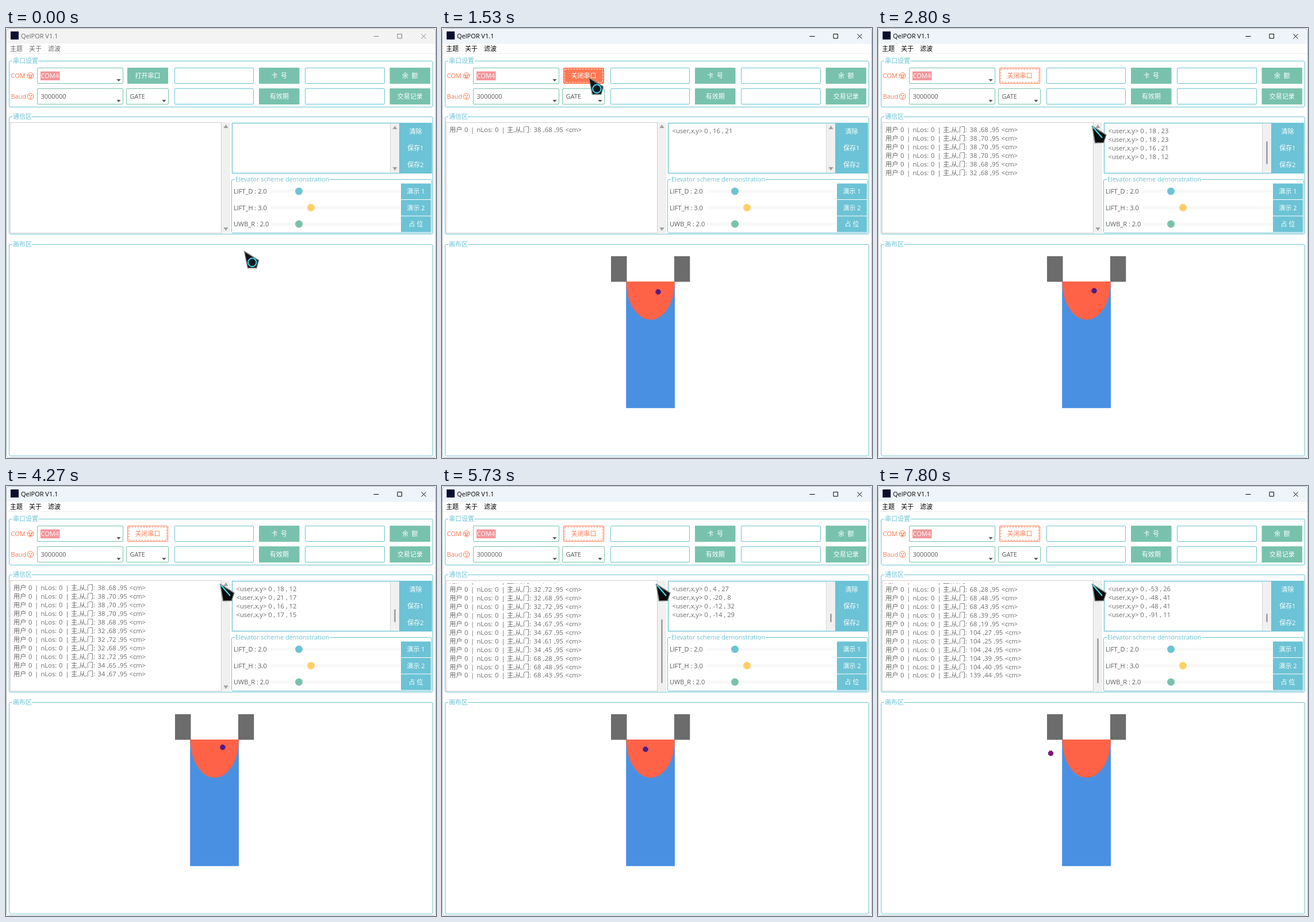
Recreate the animation shown at these times as an HTML page. Size 748x748 px, loop 8000 ms.

```html
<!DOCTYPE html>
<html lang="zh">
<head>
<meta charset="utf-8">
<title>QelPOR V1.1</title>
<style>
html, body { margin: 0; width: 100%; height: 100%; overflow: hidden; background: #fff; }
svg { display: block; width: 748px; height: 748px; }
text { font: 11px "Open Sans", "Noto Sans CJK SC", "Noto Sans CJK", sans-serif; fill: #5a5a5a; }
.log text { font-size: 11.2px; fill: #6a6a6a; }
#log text { word-spacing: .8px; }
</style>
</head>
<body>
<svg id="stage" viewBox="0 0 748 748" xmlns="http://www.w3.org/2000/svg"></svg>
<script>
const CYAN = '#6cc3d5', GREEN = '#78c2ad', ORANGE = '#ff7851', YELLOW = '#ffce67';
const LOOP = 8000, TICK = 1000 / 15, GATE = 95;

// tick, distance to main, distance to slave, marker x, marker y
const ROWS = [
  [23, 38, 68, 376, 459], [26, 38, 70, 376.5, 459.5], [30, 38, 70, 377, 460],
  [34, 38, 70, 377, 460], [38, 38, 68, 376.5, 459], [42, 32, 68, 376, 457],
  [46, 32, 72, 378, 456.5], [49, 32, 68, 378, 455.5], [57, 32, 72, 379, 456],
  [61, 34, 65, 377, 454.5], [64, 34, 67, 377, 454.5], [68, 34, 67, 377, 454.5],
  [71, 34, 61, 375, 452], [75, 34, 45, 370, 459], [80, 68, 28, 359, 455],
  [83, 68, 48, 356, 457], [86, 68, 43, 354, 458], [90, 68, 39, 351, 460],
  [94, 68, 19, 346, 460], [98, 104, 27, 333, 467], [102, 104, 25, 324, 471],
  [106, 104, 24, 320, 468], [109, 104, 39, 319, 466], [113, 104, 40, 320, 467],
  [117, 139, 44, 300.5, 465]
];

// cursor path: tick, x, y
const PATH = [[1, 414, 388], [9, 259, 94], [12, 255, 86], [26, 255, 86], [30, 372, 170]];

const attrs = o => Object.entries(o).map(([k, v]) => `${k}="${v}"`).join(' ');
const rect = (x, y, x2, y2, fill, more = {}) =>
  `<rect ${attrs({ x, y, width: x2 - x, height: y2 - y, fill, ...more })}/>`;
const path = (d, fill, more = {}) => `<path ${attrs({ d, fill, ...more })}/>`;
const dot = (cx, cy, r, fill, more = {}) => `<circle ${attrs({ cx, cy, r, fill, ...more })}/>`;
const text = (x, y, s, fill, more = {}) =>
  `<text ${attrs({ x, y: y + 4, ...(fill ? { style: 'fill:' + fill } : {}), ...more })}>${s}</text>`;
const label = (x, y, s, fill = '#fff') =>
  text(x, y, s, fill, { 'text-anchor': 'middle', 'xml:space': 'preserve' });
const group = (id, body, more = {}) => `<g ${attrs({ id, ...more })}>${body}</g>`;
const box = (x, y, x2, y2, stroke) => rect(x, y, x2, y2, '#fff', { stroke, rx: 1.5 });
const button = (x, y, x2, y2, s, fill) =>
  rect(x, y, x2, y2, fill, { rx: 1 }) + label((x + x2) / 2, (y + y2) / 2, s);
const arrow = (x, y, w, h, fill) => path(`M${x - w} ${y}h${2 * w}l${-w} ${h}z`, fill);
const frame = (x, y, x2, y2, gap, s) =>
  rect(x, y, x2, y2, 'none', { stroke: CYAN, rx: 2.5 }) +
  rect(x + 5.5, y - 2, x + gap, y + 2, '#fff') + text(x + 6.5, y - 1, s, CYAN);
const combo = (x, y, x2, s) =>
  box(x, y, x2, y + 27, GREEN) + text(x + 6, y + 13.5, s) + arrow(x2 - 7.5, y + 19.5, 3.7, 4, '#5a5a5a');
const face = (y, body) =>
  `<g fill="none" stroke="${ORANGE}">` + dot(42.5, y, 5.3, 'none') + body + '</g>';

function titleBar() {
  return rect(0, 0, 748, 27.5, '#f3f3f3', { id: 'bar' }) +
    rect(8, 6, 22, 20, '#0b0f2e') + text(26, 14, 'QelPOR V1.1', 'inherit') +
    ['主题', '关于', '滤波'].map((s, i) => text(7 + 33 * i, 36, s, 'inherit')).join('') +
    path('M639.5 14.5h9M681 10.5h7.5v7.5h-7.5zM722.5 10.5l8 8m0 -8l-8 8', 'none', { stroke: 'currentColor' }) +
    path('M0 44.5h748', 'none', { stroke: '#f0f0f0' });
}

function portPanel() {
  let s = frame(5.5, 57.5, 742.5, 137.5, 51, '串口设置');
  s += text(8.5, 83, 'COM', ORANGE) + text(8.5, 119, 'Baud', ORANGE);
  s += face(83, path('M38.5 81.5l2 2 1.7-2.5M43 81l1.6 2.5 2-2M40 85q2.5 3.5 5 0z', ORANGE));
  s += face(119, dot(40.6, 117.5, .7, ORANGE) + dot(44.4, 117.5, .7, ORANGE) + dot(42.5, 121.4, 1.4, 'none'));
  s += combo(54.5, 69.5, 203.5, '') + rect(60, 75.5, 93.5, 91, '#f3969a') + text(60.5, 83, 'COM4', '#fff');
  s += combo(54.5, 105.5, 203.5, '3000000') + combo(209.5, 105.5, 282.5, 'GATE');
  const names = [['卡  号', '余  额'], ['有效期', '交易记录']];
  names.forEach((pair, i) => {
    const y = 69 + 36 * i;
    pair.forEach((name, j) => {
      s += box(293.5 + 227 * j, y + .5, 430.5 + 228 * j, y + 27.5, CYAN);
      s += button(440 + 227.5 * j, y, 510.5 + 227.5 * j, y + 28, name, GREEN);
    });
  });
  return s;
}

function scrollBar(id, x, y, y2) {
  const mid = x + 7.5;
  return rect(x, y, x + 15, y2, '#f0f0f0') +
    group(id + 'Arrows', arrow(mid, y + 10, 4, -6, '#a0a0a0') + arrow(mid, y2 - 10, 4, 6, '#a0a0a0')) +
    rect(mid - 1, 0, mid + 1, 0, '#868686', { id: id + 'Thumb', rx: 1 });
}

function dataPanel() {
  let s = frame(5.5, 154.5, 742.5, 358.5, 39, '通信区');
  s += rect(7.5, 164.5, 374.5, 356.5, '#fff', { stroke: '#cfcfcf' }) + scrollBar('left', 375, 164, 357);
  s += rect(393.5, 165.5, 740.5, 252.5, '#fff', { stroke: CYAN, 'stroke-width': 1.3 });
  s += path('M668.5 166v86', 'none', { stroke: '#d8d8d8' }) + scrollBar('right', 669, 166, 252);
  s += rect(684, 165, 741, 253, CYAN);
  ['清除', '保存1', '保存2'].forEach((t, i) => s += label(712.5, 180 + 29 * i, t));
  s += frame(392.5, 263.5, 740.5, 356.5, 170, 'Elevator scheme demonstration');
  const sliders = [
    ['LIFT_D : 2.0', 509.5, CYAN, '演示 1'],
    ['LIFT_H : 3.0', 530.5, YELLOW, '演示 2'],
    ['UWB_R : 2.0', 509.5, GREEN, '占 位']
  ];
  sliders.forEach(([name, x, color, act], i) => {
    const y = 284 + 28.5 * i;
    s += text(396, y, name) + rect(461, y - 2.5, 686, y + 2.5, '#f8f8f8') + dot(x, y, 6.5, color);
    s += button(687, y - 13.5, 739, y + 13.9, act, CYAN);
  });
  return s + group('log', '', { class: 'log', 'clip-path': 'url(#logClip)' }) + group('user', '', { class: 'log' });
}

function lift() {
  return rect(294, 397, 321.5, 441.5, '#6c6c6c') + rect(404, 397, 431.3, 441.5, '#6c6c6c') +
    rect(320.2, 441, 405, 661.2, '#4a90e2') +
    path('M320.4 441h84.6a42.3 66.5 0 0 1 -84.6 0z', '#ff6347') +
    group('marker', dot(0, 0, 4.4, 'currentColor') +
      dot(0, 0, 4.2, 'none', { stroke: 'currentColor', 'stroke-width': 1.4, 'stroke-dasharray': '1.7 1.6' }));
}

function cursor() {
  const edge = { stroke: '#8a8a8a', 'stroke-width': 1.5, 'stroke-linejoin': 'round' };
  return group('cursor',
    group('ring', path('M.5 .5L25.5 16 22 29.5 6.5 29.5z', '#101416', edge) +
      dot(14.3, 19.8, 7.2, '#0c1c20', { stroke: '#45d5ea', 'stroke-width': 2 })) +
    group('blade', path('M.5 .5L25 16 20.5 29.5 5.5 30z', '#080b0c', edge) +
      path('M1.5 2L18 21', 'none', { stroke: '#3fd8e0', 'stroke-width': 2.2 })));
}

const $ = id => document.getElementById(id);
$('stage').innerHTML =
  '<defs><clipPath id="logClip"><rect x="8" y="169" width="366" height="186"/></clipPath></defs>' +
  rect(0, 0, 748, 748, '#fff') + group('top', titleBar()) + portPanel() + group('toggle', '') +
  dataPanel() + frame(5.5, 376.5, 742.5, 744.5, 39, '画布区') + group('lift', lift()) +
  rect(.5, .5, 747.5, 747.5, 'none', { stroke: '#b9bcbe', rx: 6 }) + cursor();

function toggle(n) {
  if (n < 19) return button(211, 69, 282, 97, '打开串口', n < 8 ? GREEN : '#86c9b6');
  const solid = n < 28, ink = solid ? '#fff' : ORANGE;
  return rect(211.5, 69.5, 281.5, 96.5, solid ? ORANGE : '#fff', { stroke: ORANGE, rx: 1.5 }) +
    rect(213.5, 71.5, 279.5, 94.5, 'none', { stroke: ink, 'stroke-width': .9, 'stroke-dasharray': '3 2' }) +
    label(246.5, 83, '关闭串口', ink);
}

// position from the two distances, cut to whole centimetres
function locate(a, b) {
  const x = Math.trunc((b * b - a * a) / (2 * GATE));
  return [x, Math.trunc(Math.sqrt(Math.abs(a * a - (GATE / 2 - x) ** 2)))];
}

function logRow([, a, b], y) {
  return text(13, y, '用户 0') + text(50, y, '|') + text(60.5, y, 'nLos: 0') + text(103.5, y, '|') +
    text(113, y, '主,从,门:') + text(159.5, y, `${a} ,${b} ,${GATE} &lt;cm&gt;`);
}

function userRow([, a, b], i) {
  const [x, y] = locate(a, b);
  return text(400.5, 179 + 15 * i, `&lt;user,x,y&gt; 0 , ${x} , ${y}`);
}

function thumb(id, on, end, size) {
  $(id + 'Arrows').style.display = on ? 'none' : '';
  const bar = $(id + 'Thumb');
  bar.setAttribute('y', end - size);
  bar.setAttribute('height', on ? size : 0);
}

function cursorAt(n) {
  if (n <= PATH[0][0]) return PATH[0].slice(1);
  const i = PATH.findIndex(p => p[0] > n);
  if (i < 0) return PATH[PATH.length - 1].slice(1);
  const [t0, x0, y0] = PATH[i - 1], [t1, x1, y1] = PATH[i];
  const u = (n - t0) / (t1 - t0), k = u * u * (3 - 2 * u);
  return [x0 + (x1 - x0) * k, y0 + (y1 - y0) * k];
}

function draw(n) {
  const active = n >= 18;
  $('top').setAttribute('color', active ? '#000' : '#808080');
  $('top').setAttribute('fill', active ? '#000' : '#686868');
  $('bar').setAttribute('fill', active ? '#eef4fa' : '#f3f3f3');
  $('toggle').innerHTML = toggle(n);

  const rows = ROWS.filter(r => r[0] <= n), count = rows.length;
  const full = count > 11;
  $('log').innerHTML = rows.slice(-12).map((r, i) => logRow(r, (full ? 165 : 177) + 14.95 * i)).join('');
  $('user').innerHTML = rows.slice(-4).map(userRow).join('');
  thumb('left', full, 343, 164 * 12.8 / (count + 1.9));
  thumb('right', count > 4, 237, Math.max(15, 58 * 4.4 / (count + .4)));

  $('lift').style.display = n >= 22 ? '' : 'none';
  const [, , , x, y] = rows[count - 1] || ROWS[0];
  $('marker').setAttribute('transform', `translate(${x} ${y})`);
  $('marker').setAttribute('color', x < 321 ? '#7d1a7d' : '#501a84');

  $('cursor').setAttribute('transform', `translate(${cursorAt(n)})`);
  $('ring').style.display = n < 30 ? '' : 'none';
  $('blade').style.display = n < 30 ? 'none' : '';
}

let last = -1;
function step() {
  const n = Math.floor((performance.now() % LOOP + 5) / TICK);
  if (n !== last) draw(last = n);
  requestAnimationFrame(step);
}
step();
</script>
</body>
</html>
```
